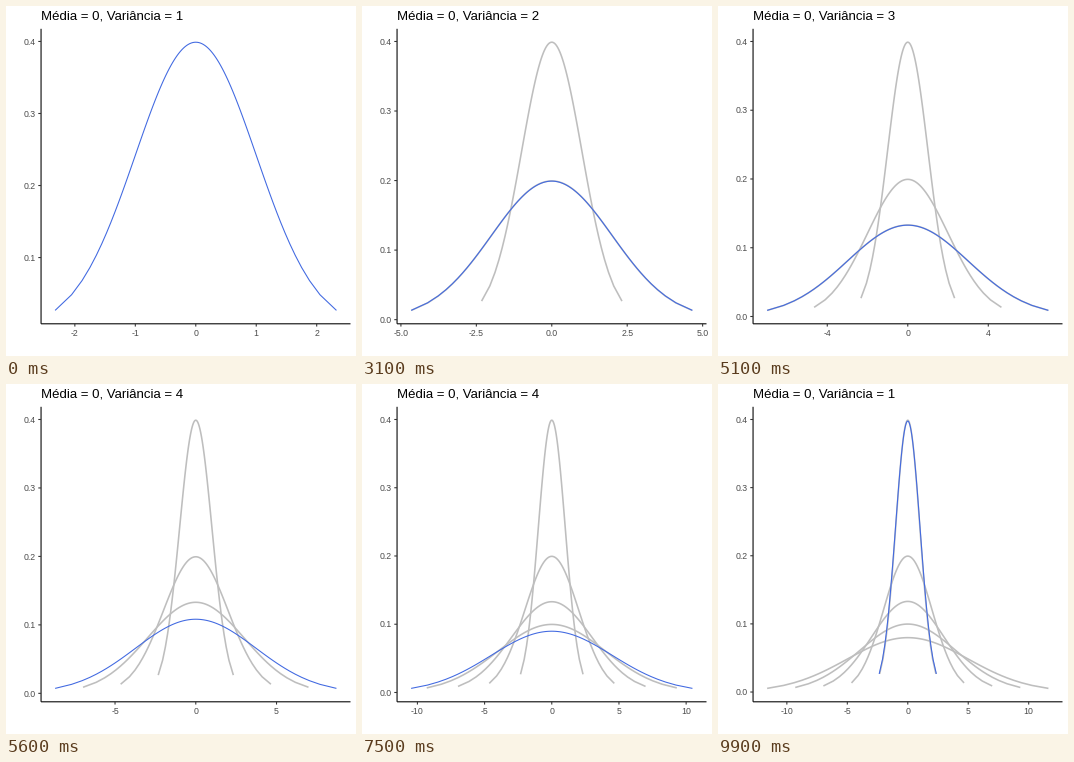
A matplotlib script that plays this animation: 350 px wide and 350 px high, repeating every 10000 ms.

```python
import math

import matplotlib.pyplot as plt
import numpy as np
from matplotlib.animation import FuncAnimation

SIZE = 350
LEFT, RIGHT, TOP, BOTTOM = 35.05, 344.5, 22.8, 317.8
PT = 0.72  # points per pixel at 100 dpi
TICK = 2.75
HOLD, MOVE, STATES = 10, 10, 5
BLUE, GRAY = "#4169E1", "#BEBEBE"

# Percentiles of the standard normal and their densities
grid = np.linspace(-3, 3, 6001)
cdf = [0.5 * (1 + math.erf(g / math.sqrt(2))) for g in grid]
Z = np.interp(np.arange(1, 100) / 100, cdf, grid)
PDF = np.exp(-Z**2 / 2) / math.sqrt(2 * math.pi)

fig = plt.figure(figsize=(3.5, 3.5), dpi=100, facecolor="white")
ax = fig.add_axes([0, 0, 1, 1])


def ease(t):
    return 4 * t**3 if t < 0.5 else 1 - 4 * (1 - t)**3


def bell(a, b, t):
    """Curve between the normals with deviations a and b."""
    return Z * (a + (b - a) * t), PDF * (1 / a + (1 / b - 1 / a) * t)


def nice_step(r):
    """Best step for about five ticks over -r..r (extended Wilkinson score)."""
    best, best_score = 1, -math.inf
    for i, q in enumerate((1, 5, 2, 2.5, 4, 3)):
        for step in (q / 10, q, q * 10):
            for n in range(1, 6):
                end = n * step
                cover = 1 - ((r - end) / (0.2 * r))**2
                ratio = max(end, r) / (2 * step)
                density = 2 - max(ratio, 1 / ratio)
                score = 0.25 * (1 - i / 5) + 0.2 * cover + 0.5 * density
                if score > best_score:
                    best, best_score = step, score
    return best


def line(x, y, color, width):
    ax.plot(x, y, color=color, lw=width * PT, solid_capstyle="butt",
            solid_joinstyle="round", snap=False)


def text(x, y, s, size, color, ha):
    ax.text(x, y, s, fontsize=size * PT, color=color, ha=ha, va="baseline",
            family="Liberation Sans")


def draw(frame):
    ax.clear()
    ax.set_xlim(0, SIZE)
    ax.set_ylim(SIZE, 0)
    ax.axis("off")

    k, phase = divmod(frame, HOLD + MOVE)
    now, nxt = k + 1, (k + 1) % STATES + 1
    t = ease(max(0, phase - HOLD) / MOVE)
    past = k + (phase > HOLD)
    curves = [bell(sd, sd, 0) for sd in range(1, past + 1)]
    curves.append(bell(now, nxt, t))

    # The view follows everything drawn, with a 5 % margin
    half = 1.1 * max(x[-1] for x, _ in curves)
    low = min(y.min() for _, y in curves)
    high = max(y.max() for _, y in curves)
    pad = 0.05 * (high - low)
    low, high = low - pad, high + pad

    def px(x):
        return (LEFT + RIGHT) / 2 + x * (RIGHT - LEFT) / (2 * half)

    def py(y):
        return BOTTOM - (y - low) * (BOTTOM - TOP) / (high - low)

    for x, y in curves[:-1]:
        line(px(x), py(y), GRAY, 1.6)
    x, y = curves[-1]
    line(px(x), py(y), BLUE, 1.07)

    line([LEFT, LEFT], [TOP, BOTTOM], "black", 1.07)
    line([LEFT, RIGHT], [BOTTOM, BOTTOM], "black", 1.07)

    step = nice_step(half)
    places = 0 if step == int(step) else 1
    for n in range(-5, 6):
        v = n * step
        if abs(v) <= half:
            line([px(v)] * 2, [BOTTOM, BOTTOM + TICK], "#333333", 1.07)
            text(px(v), 330, f"{v:.{places}f}", 8.8, "#4D4D4D", "center")
    for n in range(5):
        v = n / 10
        if low <= v <= high:
            line([LEFT - TICK, LEFT], [py(v)] * 2, "#333333", 1.07)
            text(LEFT - 4.95, py(v) + 3.2, f"{v:.1f}", 8.8, "#4D4D4D", "right")

    state = now if phase <= HOLD + MOVE // 2 else nxt
    text(LEFT, 13.4, f"Média = 0, Variância = {state}", 13.2, "black", "left")
    return []


anim = FuncAnimation(fig, draw, frames=STATES * (HOLD + MOVE), interval=100,
                     repeat=True, repeat_delay=0)
plt.show()
```
